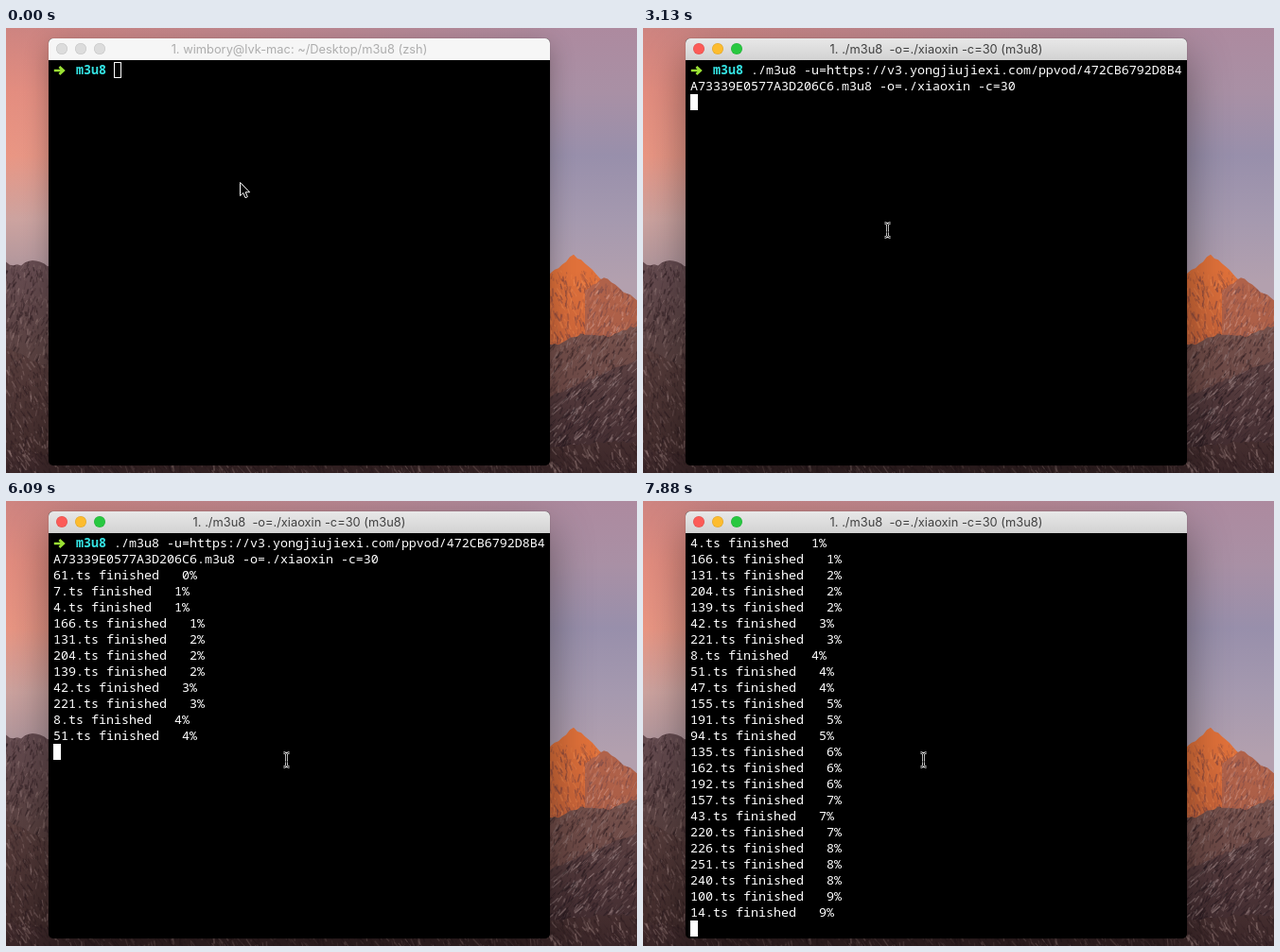
Write an HTML page with a canvas that moves like this. It is 667x471 px and loops after 8 s.

```html
<!DOCTYPE html>
<html lang="en">
<head>
<meta charset="utf-8">
<title>m3u8 download</title>
<style>
  html, body { margin: 0; width: 100%; height: 100%; overflow: hidden; background: #3a2526; }
  #stage { position: relative; width: 667px; height: 471px; overflow: hidden; }
  #stage > *, #win > * { position: absolute; }
  #win {
    left: 45px; top: 11px; width: 530px; height: 452px;
    border-radius: 5px; background: #000;
    box-shadow: 0 0 1px rgba(0,0,0,.4), 0 8px 26px rgba(0,0,0,.3);
  }
  #win.on { box-shadow: 0 0 1px rgba(0,0,0,.5), 0 18px 46px rgba(0,0,0,.42); }
  #bar {
    left: 0; top: 0; width: 530px; height: 23px;
    border-radius: 5px 5px 0 0; background: #f6f6f6; color: #adadad;
    font: 12.85px/23px Inter, sans-serif; text-align: center; white-space: pre;
  }
  .on #bar { background: linear-gradient(#e8e8e8, #d2d2d2); color: #404040; }
  .light {
    top: 5px; width: 12px; height: 12px; border-radius: 50%;
    background: #dcdcdc; box-shadow: inset 0 0 0 .6px #c8c8c8;
  }
  .on .light { background: var(--c); box-shadow: inset 0 0 0 .6px rgba(0,0,0,.12); }
  #term {
    left: 5px; top: 25px; margin: 0; color: #fff;
    font: 13.333px/17px "Noto Sans Mono", monospace;
    white-space: pre; font-variant-ligatures: none;
  }
  #term b { color: #34e2e2; }
  #caret { width: 8px; height: 17px; box-sizing: border-box; border: 1px solid #fff; }
  .on #caret { background: #fff; }
  #thumb { left: 521px; top: 426px; width: 7px; height: 24px; border-radius: 3.5px; background: #8c8c8c; }
  svg { overflow: visible; fill: none; }
</style>
</head>
<body>
<div id="stage">
  <canvas id="bg" width="667" height="471"></canvas>
  <div id="win">
    <div id="bar"></div>
    <i class="light" style="left:8px;--c:#fc5b57"></i>
    <i class="light" style="left:28px;--c:#fdbc2e"></i>
    <i class="light" style="left:48px;--c:#28c840"></i>
    <pre id="term"></pre>
    <svg id="prompt" width="13" height="10" style="left:5px;top:28.5px">
      <path d="M.8 5H10M6.4 1L10.8 5L6.4 9" stroke="#9be234" stroke-width="2.6"/>
    </svg>
    <div id="caret"></div>
    <div id="thumb"></div>
  </div>
  <svg id="arrow" width="12" height="18" style="left:247px;top:163px">
    <path d="M.5 .5V14.6L3.8 11.6L6 16.7L8.3 15.7L6.2 10.8H10.6Z" fill="#000" stroke="#fff"/>
  </svg>
  <svg id="beam" width="1" height="1" style="left:0;top:0">
    <defs><path id="ibar" d="M-3-7.5Q-.5-7.5 0-5.5Q.5-7.5 3-7.5M0-6V6M-3 7.5Q-.5 7.5 0 5.5Q.5 7.5 3 7.5M-1.5 2H1.5"/></defs>
    <use href="#ibar" stroke="#fff" stroke-width="2.4"/>
    <use href="#ibar" stroke="#000"/>
  </svg>
</div>
<script>
const $ = id => document.getElementById(id);
const LOOP = 8000, TICK = 146, ROWS = 25, W = 667, H = 471;

// ---- wallpaper ----
const ctx = $('bg').getContext('2d');
let seed = 11;
const rnd = () => (seed = (seed * 16807) % 2147483647) / 2147483647;

function fade(y0, y1, ...colors) {
  const g = ctx.createLinearGradient(0, y0, 0, y1);
  colors.forEach((c, i) => g.addColorStop(i / (colors.length - 1), c));
  return g;
}

function sky() {
  ctx.fillStyle = fade(0, 270, '#ce8480', '#e48d7f', '#ea9683', '#cda39f', '#a8929b');
  ctx.fillRect(0, 0, W, H);
  ctx.fillStyle = fade(0, 270, '#ad8a9f', '#a990a5', '#988fab', '#a599af', '#b3a0ae');
  for (let x = 0; x < W; x++) {
    ctx.globalAlpha = Math.min(1, x / 590);
    ctx.fillRect(x, 0, 1, H);
  }
  ctx.globalAlpha = 1;
}

// A mountain below top(x), roughened with fine slanted strokes of shade and light.
function rock(x0, x1, top, colors, [shade, light], slant) {
  ctx.save();
  ctx.beginPath();
  ctx.moveTo(x0, H);
  for (let x = x0; x <= x1 + 4; x += 4) ctx.lineTo(x, top(x) + rnd() * 3 - 1.5);
  ctx.lineTo(x1, H);
  const y0 = Math.min(top(x0), top(x1), top((x0 + x1) / 2));
  ctx.fillStyle = fade(y0, H, ...colors);
  ctx.fill();
  ctx.clip();
  const count = (x1 - x0) * (H - y0) / 16;
  for (let i = 0; i < count; i++) {
    const x = x0 + rnd() * (x1 - x0), y = y0 + rnd() * (H - y0), len = 2 + rnd() * 7;
    ctx.strokeStyle = rnd() < .6 ? shade : light;
    ctx.globalAlpha = .15 + rnd() * .4;
    ctx.lineWidth = .5 + rnd() * 1.4;
    ctx.beginPath();
    ctx.moveTo(x, y);
    ctx.lineTo(x + len * (slant + rnd() - .5), y + len);
    ctx.stroke();
  }
  ctx.restore();
}

sky();
const dark = ['#2a1a1e', '#957a78'];
rock(0, 48, x => 249 + 3 * Math.sin(x / 6), ['#664c51', '#58403f', '#462f2f'], dark, -.2);
rock(0, 48, x => 338 + x * .5, ['#573d3c', '#3e2929'], dark, .3);
rock(572, W, x => 240 + Math.abs(x - 600) * .85, ['#e0713a', '#c05f3a', '#a85236'], ['#6e3d40', '#f08a50'], .2);
rock(612, W, x => 264 + Math.abs(x - 632) * .7, ['#b0624a', '#a0563f'], ['#6a4348', '#d8a090'], -.4);
rock(572, W, x => 333 - (x - 572) * .15 + 3 * Math.sin(x / 9), ['#74504b', '#6a4744', '#4a3235'], dark, -.5);
rock(572, W, x => 391 - (x - 572) * .42, ['#5c4142', '#4c3437', '#3c282c'], ['#22161c', '#a89090'], -.8);
rock(0, W, x => 446 + 8 * Math.sin(x / 60), ['#452e2f', '#3a2628'], dark, .5);

// ---- terminal session ----
const HEAD = './m3u8 -u=https://v3.yongjiujiexi.com/ppvod/472CB6792D8B4';
const TAIL = 'A73339E0577A3D206C6.m3u8 -o=./xiaoxin -c=30';
const PARTS = '61 7 4 166 131 204 139 42 221 8 51 47 155 191 94 135 162 192 157 43 220 226 251 240 100 14';
const TOTAL = 284;
const log = PARTS.split(' ').map((n, i) => `${n}.ts finished   ${Math.round((i + 1) / TOTAL * 100)}%`);

// Progress 0..1 from start, advancing one step per tick.
const progress = (t, start, steps) =>
  Math.max(0, Math.min(steps, Math.floor((t - start) / TICK) + 1)) / steps;
const smooth = k => k * k * (3 - 2 * k);

// Downloads finish in bursts; a power above 1 makes a burst slow down.
const burst = (t, start, steps, lines, power = 1) =>
  Math.floor(lines * (1 - (1 - progress(t, start, steps)) ** power) + 1e-6);
const finished = t => burst(t, 4610, 1, 1) + burst(t, 5200, 7, 10) +
  burst(t, 6240, 3, 8, 2.5) + burst(t, 7140, 2, 6, 2.5) + burst(t, 7880, 1, 1);

// The scrollbar shows at once and fades in two ticks.
const flash = (t, from, to) => t < from ? 0 : 1 - progress(t, to, 2);

function title(t) {
  if (t < 1940) return '1. wimbory@lvk-mac: ~/Desktop/m3u8 (zsh)';
  return `1. ./m3u8  -o=./xiaoxin -c=30 (${t < 2680 ? 'zsh' : 'm3u8'})`;
}

function session(t) {
  const rows = [`   <b>m3u8</b> ${t < 1490 ? '' : HEAD}`];
  if (t >= 1640) rows.push(TAIL);
  rows.push(...log.slice(0, finished(t)));
  if (t < 1490) return { rows, col: 8, row: 0 };
  if (t < 1640) return { rows, col: 0, row: 1 };
  if (t < 1940) return { rows, col: TAIL.length, row: 1 };
  return { rows, col: 0, row: rows.length };
}

let shown = '';
function draw(t) {
  const { rows, col, row } = session(t);
  const scroll = Math.max(0, row - ROWS + 1);
  const html = rows.slice(scroll).join('\n');
  if (html !== shown) $('term').innerHTML = shown = html;
  $('prompt').style.display = scroll ? 'none' : '';
  $('caret').style.left = 5 + col * 8 + 'px';
  $('caret').style.top = 25 + (row - scroll) * 17 + 'px';

  $('win').className = t >= 890 ? 'on' : '';
  $('bar').textContent = title(t);
  $('thumb').style.opacity = Math.max(flash(t, 4170, 4610), flash(t, 5350, 5790));

  const a = smooth(progress(t, 2680, 6)), b = smooth(progress(t, 5200, 7));
  const x = Math.round(245 + 18 * a + 33 * b) + .5, y = Math.round(165 + 66 * a + 43 * b);
  $('arrow').style.display = t < 1040 ? '' : 'none';
  $('beam').style.display = t < 1040 ? 'none' : '';
  $('beam').style.transform = `translate(${x}px, ${y}px)`;
}

const t0 = performance.now();
function tick() {
  draw((performance.now() - t0) % LOOP);
  requestAnimationFrame(tick);
}
tick();
</script>
</body>
</html>
```
